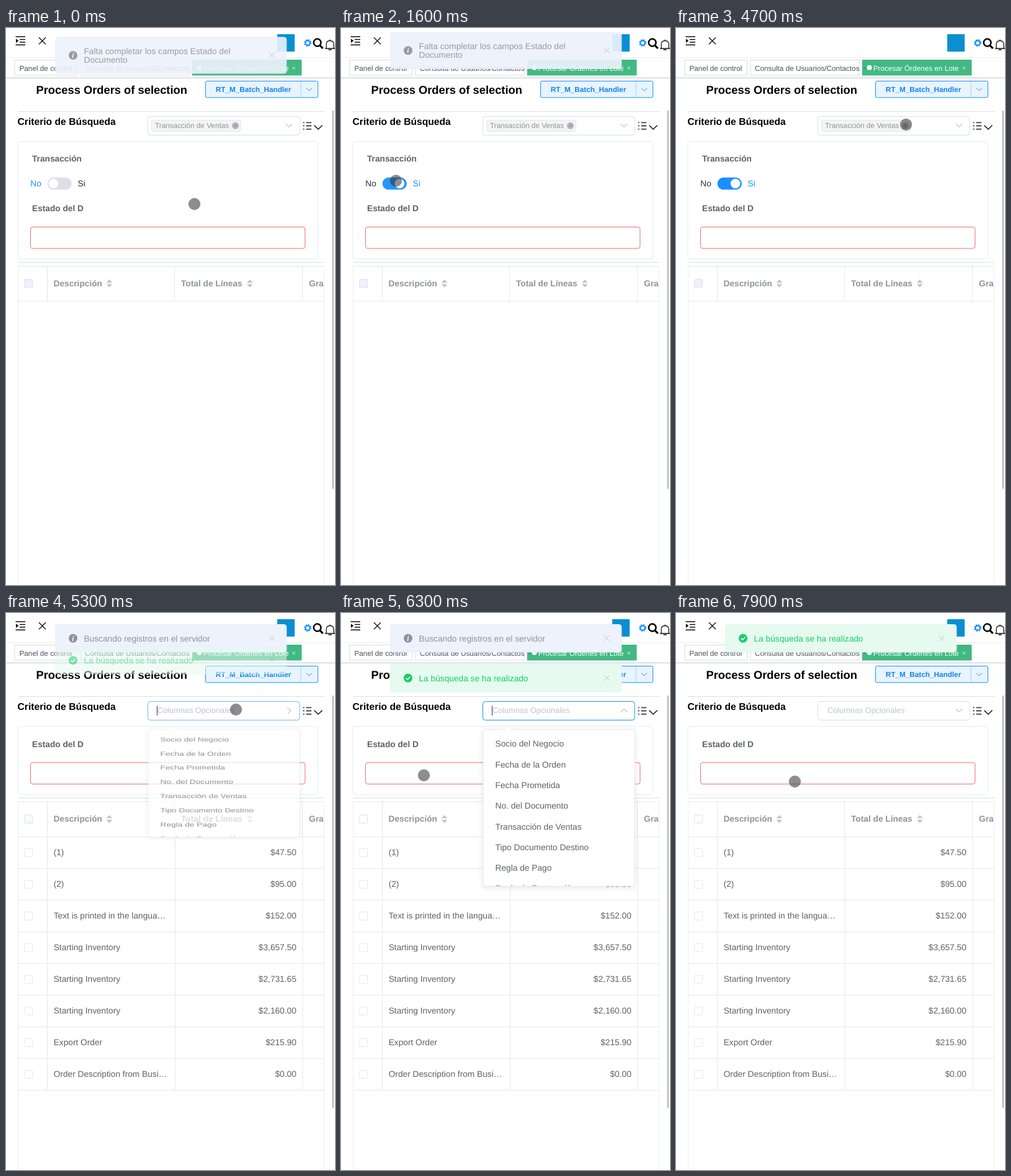
Recreate the animation shown at these times as an HTML page. Size 530x897 px, loop 8 s.

```html
<!DOCTYPE html>
<html lang="es">
<head>
<meta charset="utf-8">
<title>Procesar órdenes</title>
<style>
  html, body { margin: 0; width: 100%; height: 100%; overflow: hidden; background: #fff; }
  svg { display: block; width: 530px; height: 897px; font-family: "Liberation Sans", Arial, sans-serif; }
  text { text-rendering: geometricPrecision; }
</style>
</head>
<body>
<svg id="stage" viewBox="0 0 530 897"></svg>
<script>
const LOOP = 8000;
const MD = 13.71, SM = 11.75;
const GRAY = '#909399', TEXT = '#606266', LINE = '#e3e7ee', PALE = '#c0c4cc', BLUE = '#1890ff';

// Markup helpers; text is placed by its vertical middle.
const text = (x, y, s, fill = TEXT, size = MD, extra = '') =>
  `<text x="${x}" y="${y + size * .35}" font-size="${size}" fill="${fill}" ${extra}>${s}</text>`;
const bold = (x, y, s, fill, size, extra = '') => text(x, y, s, fill, size, 'font-weight="700" ' + extra);
const rect = (x, y, w, h, fill, stroke = 'none', r = 0, extra = '') =>
  `<rect x="${x}" y="${y}" width="${w}" height="${h}" rx="${r}" fill="${fill}" stroke="${stroke}" ${extra}/>`;
const path = (d, stroke, w = 1, extra = '') =>
  `<path d="${d}" fill="none" stroke="${stroke}" stroke-width="${w}" ${extra}/>`;
const dot = (x, y, r, fill, extra = '') => `<circle cx="${x}" cy="${y}" r="${r}" fill="${fill}" ${extra}/>`;
const cross = (x, y, r, stroke, w = 1) =>
  path(`M${x - r} ${y - r}l${2 * r} ${2 * r}M${x - r} ${y + r}l${2 * r} ${-2 * r}`, stroke, w);
const group = (id, body, extra = '') => `<g id="${id}" ${extra}>${body}</g>`;

function topBar() {
  const gear = dot(486, 24, 3.7, 'none', `stroke="${BLUE}" stroke-width="2.2"`) +
    dot(486, 24, 5.2, 'none', `stroke="${BLUE}" stroke-width="1.6" stroke-dasharray="2.1 2"`);
  return rect(-2, -2, 534, 50, '#fff', '#e6e6e6') +
    path('M15.5 14H31M22 18.4H31M22 22.8H31M15.5 27.2H31', '#111', 1.5) +
    '<path d="M16 17.3L20.3 20.6L16 23.9Z" fill="#111"/>' +
    cross(58.5, 20.8, 5.5, '#111', 1.3) +
    rect(437, 10, 28, 28, '#0a8fd2') + gear +
    dot(501.5, 23.5, 5.9, 'none', 'stroke="#000" stroke-width="2.5"') +
    path('M505.8 28L510.5 33', '#000', 3.2) +
    path('M514 33H530M516 33V26.5C516 22 518.5 20.5 522 20.5S528 22 528 26.5V33M522 20.5V18.5M519.5 35H524.5', '#111', 1.3);
}

function tabs() {
  return rect(-2, 48.5, 534, 31.5, '#fff') +
    path('M0 80H530', '#d8dce5', 1.5) + path('M0 81.5H530', '#eff0f2') +
    rect(14, 51.5, 100.5, 24.5, '#fff', '#d8dce5') + text(21.5, 64.8, 'Panel de control', '#495060', SM) +
    rect(120, 51.5, 175, 24.5, '#fff', '#d8dce5') +
    text(127, 64.8, 'Consulta de Usuarios/Contactos', '#495060', SM) +
    rect(299.8, 51, 176.6, 25.5, '#42b983') + cross(304, 64.5, 1.7, '#2e7f5b', .8) +
    dot(311.5, 63.8, 4, '#fff') + text(317.7, 64.8, 'Procesar Órdenes en Lote', '#fff', SM) +
    cross(463.6, 64.5, 2, '#fff', .9);
}

function heading() {
  return bold(48.5, 99.8, 'Process Orders of selection', '#000', 18.33) +
    rect(321.5, 85.5, 181, 26.5, '#e8f4ff', BLUE, 2) + path('M475 86V112', '#a3d3ff') +
    bold(398.5, 98.8, 'RT_M_Batch_Handler', '#1482f0', SM, 'text-anchor="middle"') +
    path('M484 96.8L488.5 101L493 96.8', BLUE) +
    path('M19 134.5H513', '#dcdfe6') +
    bold(18.5, 150.7, 'Criterio de Búsqueda', '#000', 15.67) +
    path('M483.5 152.3H492M483.5 157.5H492M483.5 162.8H492', '#444', 1.8) +
    path('M478.5 152.3h2.2M478.5 157.5h2.2M478.5 162.8h2.2', '#444', 1.8) +
    path('M496.5 156.7L503 163L509.5 156.7', '#111', 1.5);
}

function select() {
  const tag = rect(234.5, 148.5, 144, 18, '#f4f4f5', '#e6e7ea', 3) +
    text(240, 157.2, 'Transacción de Ventas', GRAY, SM) +
    dot(369.5, 157.3, 5.6, '#b4b8c0') + cross(369.5, 157.3, 2, '#85888f');
  return rect(228.5, 142.5, 244.5, 30, '#fff', '#dcdfe6', 4, 'id="selectBox"') + group('tag', tag) +
    group('hint', text(244, 157, 'Columnas Opcionales', PALE, 12.73)) +
    path('M243.5 149.5V165', '#333', 1, 'id="caret"') +
    path('M451 159.5L456 154.5L461 159.5', PALE, 1.1, 'id="chevron"');
}

function filters() {
  const flag = bold(42, 210.5, 'Transacción') +
    text(39.3, 250.5, 'No', BLUE, MD, 'id="no"') + text(115.5, 250.5, 'Si', '#303133', MD, 'id="yes"') +
    rect(66.7, 240.8, 39.2, 19.5, '#dcdfe6', 'none', 9.75, 'id="track"') + dot(76.5, 250.5, 7.8, '#fff', 'id="thumb"');
  return rect(19, 182.5, 483.5, 189.3, '#fff', '#e6ebf5', 4, 'id="card"') + group('flag', flag);
}

function table() {
  const sort = x => `<path d="M${x - 4.8} 410.2h9.6l-4.8-5.2zM${x - 4.8} 412.6h9.6l-4.8 5.2z" fill="${PALE}"/>`;
  const head = path('M19 377.5H513', '#dcdfe6') + path('M19 383.5H512.5M19 440H512.5', LINE) +
    path('M19.5 383V990M512.5 383V990', '#ebeef5') +
    path('M66.5 383V440M271.5 383V440M477.5 383V440', LINE) +
    rect(29.8, 404.8, 13, 13, '#edf2fc', '#dcdfe6', 2, 'id="allBox"') +
    bold(76.5, 411.2, 'Descripción', GRAY) + sort(166.5) +
    bold(282, 411.2, 'Total de Líneas', GRAY) + sort(392.8) + bold(488, 411.2, 'Gra', GRAY);
  const data = [['(1)', '47.50'], ['(2)', '95.00'], ['Text is printed in the langua…', '152.00'],
    ['Starting Inventory', '3,657.50'], ['Starting Inventory', '2,731.65'], ['Starting Inventory', '2,160.00'],
    ['Export Order', '215.90'], ['Order Description from Busi…', '0.00']];
  const rows = data.map(([name, sum], i) => {
    const y = 440 + 51 * i;
    return path(`M19 ${y + 51}H512.5M66.5 ${y}v51M272.5 ${y}v51M478 ${y}v51`, LINE) +
      rect(29.8, y + 19, 13, 13, '#fff', '#e3e6ec', 2) + text(76.7, y + 25.3, name) +
      text(467.8, y + 25.3, '$' + sum, TEXT, MD, 'text-anchor="end"');
  }).join('');
  return bold(42, 290.5, 'Estado del D') + rect(39.5, 320.5, 442.3, 34.5, '#fff', '#f56c6c', 3.5) +
    `<g clip-path="url(#tableClip)">${head}${group('rows', rows)}</g>`;
}

function menu() {
  const items = ['Socio del Negocio', 'Fecha de la Orden', 'Fecha Prometida', 'No. del Documento',
    'Transacción de Ventas', 'Tipo Documento Destino', 'Regla de Pago', 'Regla de Facturación'];
  return rect(229, 187.5, 244, 252.5, '#fff', '#e4e7ed', 4, 'filter="url(#shadow)"') +
    '<path d="M263.5 188.2L269.5 182.8L275.5 188.2Z" fill="#fff"/>' +
    `<g clip-path="url(#menuClip)">${items.map((s, i) => text(248.6, 210.6 + 33.3 * i, s)).join('')}</g>`;
}

// Messages are drawn with their top edge at zero.
const messageHeight = lines => 44.5 + 13.8 * (lines - 1);
function message(id, lines, good) {
  const [bg, edge, ink] = good ? ['#e7faf0', '#dcf6e8', '#13ce66'] : ['#edf2fc', '#e8edf7', GRAY];
  const h = messageHeight(lines.length), mid = h / 2 + .5;
  const mark = good ? path(`M104.7 ${mid}l2.5 2.6l4.4-4.8`, '#fff', 1.5)
    : `<text x="108" y="${mid + 4}" font-size="12" font-family="Liberation Serif, serif" font-weight="700" font-style="italic" fill="#fff" text-anchor="middle">i</text>`;
  return group(id, rect(79.8, .5, 372, h, bg, edge, 4) + dot(108, mid, 7, ink) + mark +
    lines.map((s, i) => text(125.5, 23 + 14 * i, s, ink)).join('') + cross(428.3, mid, 4.6, PALE));
}

const stage = document.getElementById('stage');
stage.innerHTML = `<defs>
  <clipPath id="tableClip"><path d="M18 370H513V1000H18Z"/></clipPath>
  <clipPath id="menuClip"><path d="M229 188H473V439.5H229Z"/></clipPath>
  <filter id="shadow"><feDropShadow dx="0" dy="2" stdDeviation="4" flood-opacity=".1"/></filter></defs>` +
  topBar() + tabs() + heading() + filters() + group('lower', table()) + select() +
  path('M526.8 133V742', '#bbb', 2.6, 'id="bar"') + group('menu', menu()) +
  message('missing', ['Falta completar los campos Estado del', 'Documento']) +
  message('searching', ['Buscando registros en el servidor']) +
  message('done', ['La búsqueda se ha realizado'], true) +
  dot(0, 0, 9.7, 'rgba(50,50,50,.556)', 'id="pointer"');

const el = {};
stage.querySelectorAll('[id]').forEach(n => el[n.id] = n);
const set = (id, attrs) => { for (const k in attrs) el[id].setAttribute(k, attrs[k]); };
const show = (id, on) => set(id, { visibility: on ? 'visible' : 'hidden' });

// CSS-style cubic Bézier easing, solved by bisection.
const bezier = (x1, y1, x2, y2) => x => {
  const curve = (a, b, s) => 3 * a * s * (1 - s) ** 2 + 3 * b * s * s * (1 - s) + s ** 3;
  let lo = 0, hi = 1;
  for (let i = 0; i < 20; i++) {
    const s = (lo + hi) / 2;
    if (curve(x1, x2, s) < x) lo = s; else hi = s;
  }
  return curve(y1, y2, lo);
};
const ease = bezier(.25, .1, .25, 1), zoom = bezier(.23, 1, .32, 1), glide = bezier(.4, 0, .6, 1);
const tween = (t, start, length, curve = ease) => curve(Math.min(1, Math.max(0, (t - start) / length)));
const pulse = (t, start, end, length, curve) => tween(t, start, length, curve) - tween(t, end, length, curve);
const mix = (a, b, p) => `rgb(${a.map((v, i) => Math.round(v + (b[i] - v) * p))})`;

// Moments of the session, in ms.
const TOGGLE = 1400, REMOVE = 4900, OPEN = 5210, CLOSE = 6950;

// A message drops in from its own height above and leaves the same way.
function moveMessage(id, t, start, end, lines, top = 18) {
  const y = top - messageHeight(lines) * (1 - pulse(t, start, end, 400));
  set(id, { transform: `translate(0 ${y})`, opacity: pulse(t, start, end, 300) });
}

// Pointer moves: start, end, then the place reached.
const moves = [[0, 1, 303.5, 283.5], [400, 1300, 88.5, 246], [1650, 2200, 295, 284], [2600, 2900, 358.5, 170],
  [3000, 3200, 365, 161], [3350, 3800, 352, 178], [4100, 4700, 370.5, 155.5], [5600, 6000, 240, 510],
  [6000, 6300, 133.5, 261.5], [6500, 6700, 234, 159], [6900, 7600, 182, 324], [7700, 7900, 191.5, 271.5]];
function movePointer(t) {
  let [, , cx, cy] = moves[0];
  for (const [start, end, x, y] of moves) {
    const p = tween(t, start, end - start, glide);
    cx += (x - cx) * p;
    cy += (y - cy) * p;
  }
  set('pointer', { cx, cy });
}

function draw(t) {
  const first = t < 1000;
  moveMessage('missing', t, first ? -2000 : TOGGLE, first ? -30 : 3370, 2);
  moveMessage('searching', t, REMOVE, 6970, 1);
  moveMessage('done', t, OPEN, LOOP, 1, 82 - 64 * tween(t, 7150, 400));

  const on = tween(t, TOGGLE, 300);
  set('track', { fill: mix([220, 223, 230], [24, 144, 255], on) });
  set('thumb', { cx: 76.5 + 19.2 * on });
  set('no', { fill: on ? '#303133' : BLUE });
  set('yes', { fill: on ? BLUE : '#303133' });

  const short = t >= REMOVE, loaded = t >= OPEN;
  show('flag', !short);
  show('tag', !short);
  show('hint', short);
  show('rows', loaded);
  show('caret', loaded && t < CLOSE);
  set('card', { height: short ? 109.8 : 189.3 });
  set('lower', { transform: `translate(0 ${short ? -79.6 : 0})` });
  set('bar', { d: `M526.8 133V${loaded ? 797 : 742}` });
  set('allBox', { fill: mix([237, 242, 252], [255, 255, 255], tween(t, OPEN, 250)) });

  const open = pulse(t, OPEN + 30, CLOSE, 300, zoom);
  set('menu', { opacity: open, transform: `translate(0 187) scale(1 ${open}) translate(0 -187)` });
  set('selectBox', { stroke: mix([220, 223, 230], [24, 144, 255], pulse(t, OPEN, CLOSE, 300)) });
  set('chevron', { transform: `rotate(${180 * (1 - pulse(t, OPEN, CLOSE, 300))} 456 157)` });
  movePointer(t);
}

const start = performance.now();
function tick() {
  draw((performance.now() - start) % LOOP);
  requestAnimationFrame(tick);
}
tick();
</script>
</body>
</html>
```
